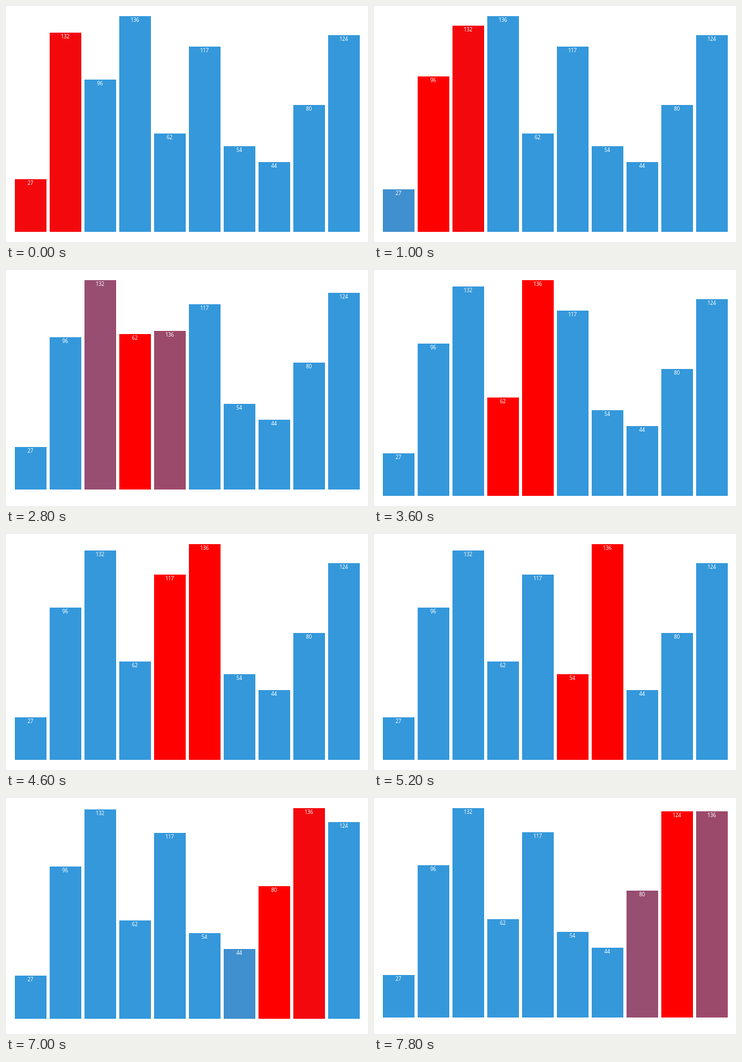
An HTML page with a canvas for the animation above (8 s loop, 572 px wide and 372 px high).

```html
<!DOCTYPE html>
<html lang="en">
<head>
<meta charset="utf-8">
<title>Bubble sort pass</title>
<style>
  html, body { margin: 0; width: 100%; height: 100%; overflow: hidden; background: #fff; }
  canvas { display: block; }
</style>
</head>
<body>
<canvas id="stage" width="572" height="372"></canvas>
<script>
const ctx = document.getElementById('stage').getContext('2d');

const LOOP = 8000, TICK = 200;
const STEP = 1000, FIRST_STEP = -350, FADE = 500;
const LEFT = 14, TOP = 16, BAR = 50, PITCH = 55, UNIT = 2.5;
const BLUE = [52, 152, 219], RED = [255, 0, 0];
const START = [132, 27, 96, 136, 62, 117, 54, 44, 80, 124];

// states[k] holds the values before comparison k
const states = [START];
for (let k = 0; k < START.length - 1; k++) {
  const next = states[k].slice();
  if (next[k] > next[k + 1]) [next[k], next[k + 1]] = [next[k + 1], next[k]];
  states.push(next);
}

const mix = (a, b, p) => a + (b - a) * p;

// cubic-bezier(0.25, 0.1, 0.25, 1)
function ease(x) {
  if (x >= 1) return 1;
  const curve = (a, b, s) => 3 * a * s * (1 - s) ** 2 + 3 * b * s * s * (1 - s) + s ** 3;
  let lo = 0, hi = 1;
  for (let i = 0; i < 30; i++) {
    const mid = (lo + hi) / 2;
    if (curve(0.25, 0.25, mid) < x) lo = mid; else hi = mid;
  }
  return curve(0.1, 1, lo);
}

const isActive = (slot, step) => step >= 0 && (slot === step || slot === step + 1) ? 1 : 0;

function draw(time) {
  const step = Math.floor((time - FIRST_STEP) / STEP);
  const p = ease((time - FIRST_STEP - step * STEP) / FADE);
  const before = states[step], after = states[step + 1];
  const heights = after.map((v, i) => UNIT * mix(before[i], v, p));
  const bottom = TOP + Math.max(...heights);

  ctx.fillStyle = '#fff';
  ctx.fillRect(0, 0, 572, 372);
  ctx.font = '8px "Noto Sans", "Open Sans", sans-serif';
  ctx.textAlign = 'center';

  after.forEach((value, i) => {
    const x = LEFT + i * PITCH;
    const y = Math.round(bottom - heights[i]);
    const heat = mix(isActive(i, step - 1), isActive(i, step), p);
    const rgb = BLUE.map((c, n) => Math.round(mix(c, RED[n], heat)));
    ctx.fillStyle = `rgb(${rgb})`;
    ctx.fillRect(x, y, BAR, Math.round(bottom) - y);
    ctx.fillStyle = '#fff';
    ctx.fillText(value, x + BAR / 2 - 0.5, y + 9);
  });
}

function frame() {
  const t = performance.now() % LOOP;
  draw(Math.floor(t / TICK) * TICK);
  requestAnimationFrame(frame);
}
frame();
</script>
</body>
</html>
```
